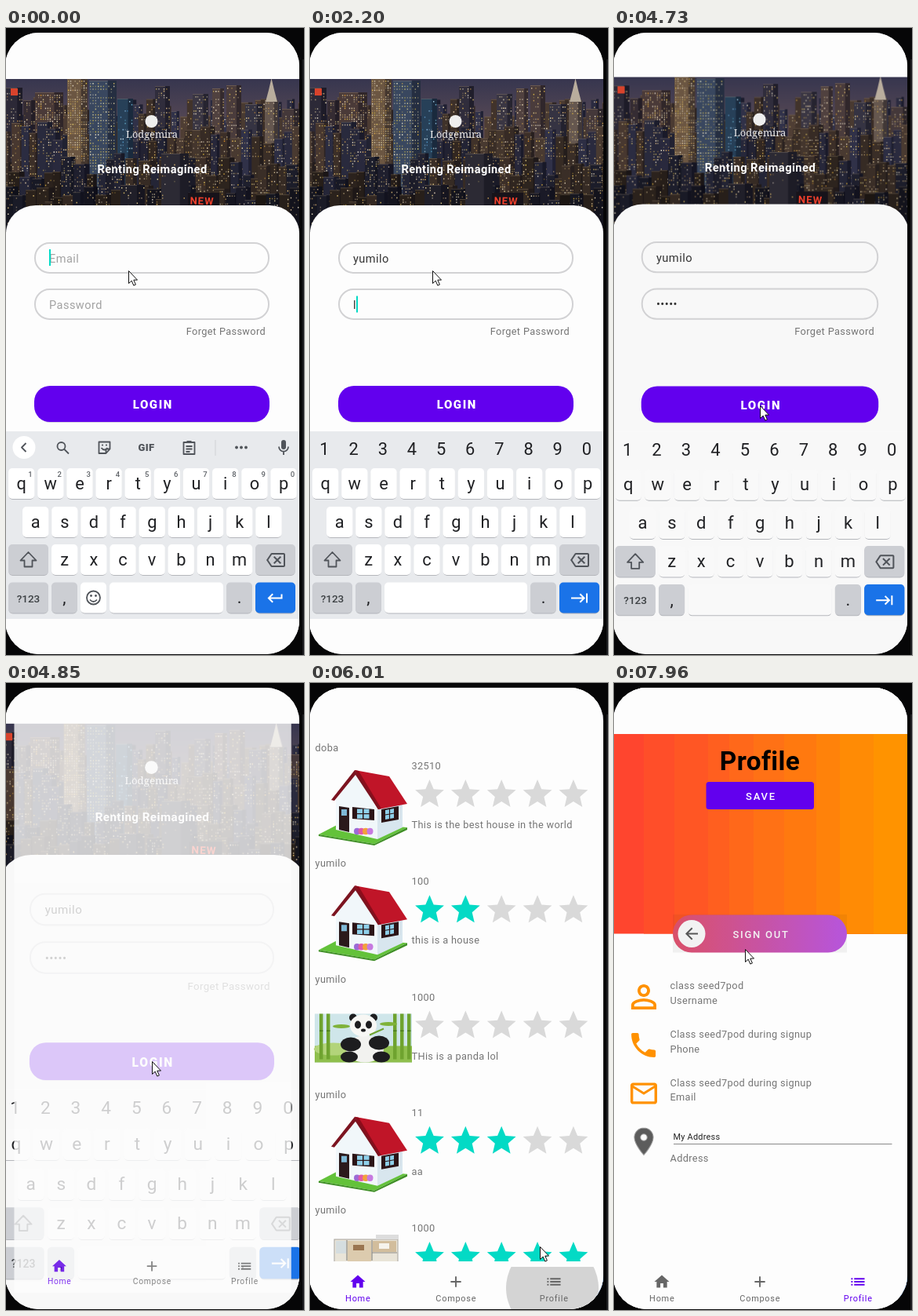
These frames come from a looping animation (380x799 px, 8000 ms). An HTML page with a canvas:

```html
<!DOCTYPE html>
<html lang="en">
<head>
<meta charset="utf-8">
<title>Rental app walkthrough</title>
<style>
  html, body { margin: 0; width: 100%; height: 100%; overflow: hidden; background: #060607; }
  #stage { position: relative; width: 380px; height: 799px; overflow: hidden; font-family: Roboto, sans-serif; }
  #edge { position: absolute; left: 378px; top: 40px; width: 2px; height: 759px; background: #1d1e21; }
  #phone, .layer, svg { position: absolute; left: 0; top: 0; width: 380px; height: 799px; }
  #phone { background: #fdfdfd; clip-path: inset(6px 6px 1px -1px round 43px); }
  .layer { transform-origin: 187px 402px; }
  #login { --board: #e8eaed; --card: #fdfdfd; --key: #fff; }
  #login.leaving { --board: #f8f8f8; --card: #f8f8f8; --key: #f9f9f9; }
  canvas { position: absolute; left: 0; top: 65px; }
  text { white-space: pre; }
  .body { font-size: 14.56px; letter-spacing: .03125em; }
  .small { font-size: 12.74px; letter-spacing: .028em; fill: #757575; }
  .nav { font-size: 10.92px; letter-spacing: .07em; text-anchor: middle; }
  .btn { font-weight: 500; font-size: 13px; letter-spacing: .135em; fill: #fff; text-anchor: middle; }
  .mid { text-anchor: middle; }
  .line { fill: none; stroke: #50545a; stroke-width: 1.8; stroke-linejoin: round; }
</style>
</head>
<body>
<div id="stage">
  <div id="edge"></div>
  <div id="phone">
    <div class="layer" id="login"><canvas id="city" width="374" height="200"></canvas><svg id="form"></svg></div>
    <div class="layer" id="app"><svg id="pages"></svg></div>
  </div>
  <svg id="pointer"><path id="cursor" d="M.5 .5v16l3.7-3.4 2.6 6 2.6-1.1-2.6-5.9h4.7z" fill="#fff" stroke="#111"/></svg>
</div>
<script>
const $ = id => document.getElementById(id);
const clamp = v => Math.max(0, Math.min(1, v));
const USER = 'yumilo', SECRET = 'lollo';

// ---- markup helpers ----
const text = (x, y, s, attrs = '') => `<text x="${x}" y="${y}" ${attrs}>${s}</text>`;
const rect = (x, y, w, h, fill, r = 0, attrs = '') =>
  `<rect x="${x}" y="${y}" width="${w}" height="${h}" rx="${r}" fill="${fill}" ${attrs}/>`;
const poly = (points, fill) => `<polygon points="${points}" fill="${fill}"/>`;
const oval = (x, y, rx, ry, fill) => `<ellipse cx="${x}" cy="${y}" rx="${rx}" ry="${ry}" fill="${fill}"/>`;
const line = (d, attrs = '') => `<path class="line" d="${d}" ${attrs}/>`;
const icon = (name, x, y, s, fill, attrs = '') =>
  `<path d="${ICONS[name]}" transform="translate(${x - 12 * s} ${y - 12 * s}) scale(${s})" ${fill && `fill="${fill}"`} fill-rule="evenodd" ${attrs}/>`;
const each = (list, fn) => [...list].map(fn).join('');

const ICONS = {
  star: 'M12 17.27L18.18 21l-1.64-7.03L22 9.24l-7.19-.61L12 2 9.19 8.63 2 9.24l5.46 4.73L5.82 21z',
  home: 'M10 20v-6h4v6h5v-8h3L12 3 2 12h3v8z',
  plus: 'M19 13h-6v6h-2v-6H5v-2h6V5h2v6h6z',
  list: 'M3 13h2v-2H3zm0 4h2v-2H3zm0-8h2V7H3zm4 4h14v-2H7zm0 4h14v-2H7zM7 7v2h14V7z',
  person: 'M12 5.9a2.1 2.1 0 1 1 0 4.2 2.1 2.1 0 0 1 0-4.2m0 9c2.97 0 6.1 1.46 6.1 2.1v1.1H5.9V17c0-.64 3.13-2.1 6.1-2.1M12 4C9.79 4 8 5.79 8 8s1.79 4 4 4 4-1.79 4-4-1.79-4-4-4zm0 9c-2.67 0-8 1.34-8 4v3h16v-3c0-2.66-5.33-4-8-4z',
  call: 'M6.62 10.79c1.44 2.83 3.76 5.14 6.59 6.59l2.2-2.2c.27-.27.67-.36 1.02-.24 1.12.37 2.33.57 3.57.57.55 0 1 .45 1 1V20c0 .55-.45 1-1 1-9.39 0-17-7.61-17-17 0-.55.45-1 1-1h3.5c.55 0 1 .45 1 1 0 1.25.2 2.45.57 3.57.11.35.03.74-.25 1.02z',
  mail: 'M22 6c0-1.1-.9-2-2-2H4c-1.1 0-2 .9-2 2v12c0 1.1.9 2 2 2h16c1.1 0 2-.9 2-2zm-2 0-8 5-8-5zm0 12H4V8l8 5 8-5z',
  pin: 'M12 2C8.13 2 5 5.13 5 9c0 5.25 7 13 7 13s7-7.75 7-13c0-3.87-3.13-7-7-7zm0 9.5a2.5 2.5 0 0 1 0-5 2.5 2.5 0 0 1 0 5z',
  back: 'M20 11H7.83l5.59-5.59L12 4l-8 8 8 8 1.41-1.41L7.83 13H20z',
  erase: 'M22 3H7c-.69 0-1.23.35-1.59.88L0 12l5.41 8.11c.36.53.9.89 1.59.89h15c1.1 0 2-.9 2-2V5c0-1.1-.9-2-2-2zm0 16H7.07L2.4 12l4.66-7H22zm-11.59-2L14 13.41 17.59 17 19 15.59 15.41 12 19 8.41 17.59 7 14 10.59 10.41 7 9 8.41 12.59 12 9 15.59z',
  enter: 'M19 7v4H5.83l3.58-3.59L8 6l-6 6 6 6 1.41-1.41L5.83 13H21V7z',
  tab: 'M11.59 7.41 15.17 11H1v2h14.17l-3.59 3.59L13 18l6-6-6-6zM20 6v12h2V6z'
};

// ---- night skyline ----
function drawCity() {
  const c = $('city').getContext('2d');
  let seed = 4711;
  const rnd = () => (seed = seed * 16807 % 2147483647) / 2147483647;
  c.translate(0, -65);
  const sky = c.createLinearGradient(0, 65, 0, 130);
  sky.addColorStop(0, '#37364f');
  sky.addColorStop(1, '#5b4b55');
  c.fillStyle = sky;
  c.fillRect(0, 65, 374, 200);

  // Floors differ in brightness, so a tower reads as broken rows of light.
  function tower(x, top, w, base, lit, hue = 34) {
    c.fillStyle = base;
    c.fillRect(x, top, w, 265 - top);
    c.fillStyle = 'rgba(6,6,18,.38)';
    c.fillRect(x + w * .68, top, w * .32, 265 - top);
    c.fillStyle = 'rgba(215,185,150,.22)';
    c.fillRect(x, top, w * .68, 1);
    const stepX = 2.2 + rnd() * 1.2, stepY = 2.6 + rnd() * 1.4;
    for (let y = top + 3; y < 262; y += stepY) {
      const floor = lit * (.4 + rnd() * 1.1);
      for (let i = x + 1; i < x + w - 1; i += stepX)
        if (rnd() < floor) {
          c.fillStyle = `hsla(${hue + rnd() * 14},${35 + rnd() * 35}%,${50 + rnd() * 38}%,${.3 + rnd() * .7})`;
          c.fillRect(i, y, 1.4, 1.6);
        }
    }
  }
  const row = (top, depth, width, light, lit) => {
    for (let x = -6; x < 374; x += width * (.5 + rnd() * .5))
      tower(x, top + rnd() * depth, width * (.7 + rnd() * .6), `hsl(${rnd() < .5 ? 238 : 22},20%,${light + rnd() * 8}%)`, lit);
  };

  row(88, 26, 13, 19, .36);
  [[0, 76, 21, '#2c2937', .4], [22, 92, 15, '#352c33', .4], [37, 82, 36, '#4a3a38', .55],
   [190, 74, 19, '#302d3c', .4], [238, 84, 20, '#3a3643', .4], [263, 77, 15, '#50413f', .4],
   [281, 73, 19, '#4a3c3c', .42], [305, 97, 22, '#353342', .42], [330, 92, 17, '#65574f', .55],
   [352, 103, 22, '#44383a', .45]].forEach(b => tower(...b));
  c.fillStyle = '#b9ad9d';
  c.beginPath();
  c.moveTo(331, 94); c.lineTo(335, 79); c.lineTo(338.5, 64); c.lineTo(342, 79); c.lineTo(346, 94);
  c.fill();
  row(118, 30, 15, 16, .38);
  tower(78, 64, 26, '#6b5642', .78);
  tower(106, 67, 35, '#39475f', .62, 42);
  tower(142, 90, 20, '#274058', .35, 195);
  row(158, 34, 17, 12, .34);
  row(198, 24, 20, 9, .26);
  tower(198, 160, 35, '#2c2a34', .1);
  tower(146, 200, 31, '#201f29', .16);
  c.fillStyle = '#17131a';
  c.fillRect(232, 210, 40, 55);
  c.fillStyle = '#d8432c';
  c.fillRect(6, 77, 9, 9);
}

// ---- login form and keyboard ----
const LETTER = 'font-size="21.8" class="mid" fill="#202124"';
const GREY = '#ccced3';
const key = (x, y, w, label = '', fill = 'var(--key)') =>
  rect(x + .5, y + 1, w - 1, 39, '#b4b6bb', 5) + rect(x, y, w, 39, fill, 5) + text(x + w / 2, y + 26.5, label, LETTER);
const DIGITS = '1234567890', PITCH = 37.15;

function keyboard() {
  const row = (letters, x, y) => each(letters, (l, i) => key(x + i * PITCH, y, 33.3, l));
  return rect(0, 514, 374, 239, 'var(--board)') +
    row('qwertyuiop', 3, 561) + row('asdfghjkl', 21, 610) + row('zxcvbnm', 58, 658) +
    key(3, 658, 51, '', GREY) + line('M28.5 668l-10 10.5h5v8h10v-8h5z') +
    key(318, 658, 51, '', GREY) + icon('erase', 344, 678, 1, '#50545a') +
    key(3, 706.5, 51, '', GREY) + text(28.5, 731.5, '?123', 'font-size="13.5" font-weight="500" class="mid" fill="#3c4043"') +
    key(58, 706.5, 33, ',', GREY) + key(281, 706.5, 33, '.', GREY) + key(318, 706.5, 51, '', '#1a73e8') +
    `<g id="mailKeys">` + key(95, 706.5, 33) + key(132, 706.5, 145) + icon('enter', 343.5, 726.5, 1, '#fff') +
    `<circle class="line" cx="111.5" cy="726" r="8.5"/>` + line('M107 728.5q4.5 5 9 0') +
    oval(108.5, 723.5, 1.4, 1.4, '#50545a') + oval(114.5, 723.5, 1.4, 1.4, '#50545a') +
    each(DIGITS, (d, i) => text(31 + i * PITCH, 572, d, 'font-size="9.5" font-weight="500" class="mid" fill="#5f6368"')) +
    oval(23, 534.5, 14.5, 14.5, '#fff') + `<path class="line" id="chevron"/>` +
    rect(351, 525, 6, 12, '#50545a', 3) + line('M348 533.5a6 6.2 0 0 0 12 0M354 540v4') +
    `<g id="tools"><circle class="line" cx="70.5" cy="533" r="5"/>` + line('M74 536.5l6 6', 'stroke-width="2.2"') +
    line('M118.5 527.5h14v9l-5 5.5h-9zM121.5 535q4 5 8 0M132.5 536.5h-5v5') +
    oval(123, 531.5, 1.1, 1.1, '#50545a') + oval(128, 531.5, 1.1, 1.1, '#50545a') +
    text(179, 539, 'GIF', 'font-size="13" font-weight="900" letter-spacing=".4" class="mid" fill="#50545a"') +
    line('M226.5 528h14v15h-14zM229.5 533h8M229.5 536.5h8M229.5 540h5M230.5 527h6') +
    rect(266.5, 525, 1, 20, '#d0d2d6') + each([294, 300, 306], x => oval(x, 534.5, 1.9, 1.9, '#50545a')) + `</g>` +
    `<g id="words" font-size="13.2" class="mid" fill="#3c4043">` +
    each([82.5, 190, 297], (x, i) => text(x, 539, '', `id="word${i}"`)) +
    rect(136, 525, 1, 20, '#d0d2d6') + rect(243, 525, 1, 20, '#d0d2d6') + `</g></g>` +
    `<g id="passKeys">` + key(95, 706.5, 182) + icon('tab', 344, 726.5, 1, '#fff') +
    each(DIGITS, (d, i) => text(18.5 + i * PITCH, 543.5, d, LETTER)) + `</g>`;
}

$('form').innerHTML =
  rect(0, 0, 374, 65, '#fdfdfd') +
  oval(185.5, 119, 8, 8, '#eee') +
  text(186, 140, 'Lodgemira', 'font-size="12.8" font-family="Noto Serif, serif" class="mid" fill="#eee"') +
  text(186.5, 185, 'Renting Reimagined', 'class="body mid" font-weight="700" fill="#fff"') +
  text(250, 225, 'NEW', 'font-size="13" font-weight="700" letter-spacing="1" class="mid" fill="#f0402c" transform="rotate(2 250 220)"') +
  `<path d="M0 262A38 36 0 0 1 38 226H336A38 36 0 0 1 374 262V799H0z" fill="var(--card)"/>` +
  each([274, 333], y => rect(37, y, 298, 38, 'none', 18.5, 'stroke="#d2d2d4" stroke-width="2"')) +
  text(55, 298.5, '', 'id="mail" class="body"') + text(55, 357.5, '', 'id="pass" class="body"') +
  rect(55, 302, 0, 1, '#333', 0, 'id="under"') + rect(55, 282, 2, 21, '#03dac5', 0, 'id="caret"') +
  text(331, 391, 'Forget Password', 'class="small" text-anchor="end"') +
  rect(37, 458, 298, 45, '#d9d6e0', 20) + rect(36, 456, 300, 46, '#6200ee', 20) +
  text(187.3, 485.3, 'LOGIN', 'font-size="15" font-weight="800" letter-spacing="1.6" class="mid" fill="#fff"') +
  keyboard();

// ---- feed ----
const house =
  poly('11,193 40,178 124,184 82,205', '#63c23a') + poly('11,193 82,205 124,184 124,187 82,207 11,195', '#3f8f26') +
  poly('33,147 58,116 87,158 86,199 33,187', '#f1f7fa') + poly('86,160 118,154 118,184 86,199', '#d8e6ee') +
  poly('57,111 101,119 124,154 87,161', '#c01528') + poly('57,111 62,112 91,160 87,161', '#8d0c1b') +
  poly('57,111 27,149 31,150 58,117 87,161 88,157', '#7c1420') +
  poly('37,157 50,159 50,190 37,187', '#2b1a1c') + rect(40, 161, 7, 8, '#7fb9d6') +
  poly('54,158 82,161 82,175 54,173', '#2b1416') +
  each([60, 68.5], x => rect(x, 160.5, 7, 5.5, '#8fd0ea') + rect(x, 167.2, 7, 5.5, '#8fd0ea')) +
  poly('91,161 113,157 113,174 91,178', '#2b1416') + poly('96,162 107,160 107,172 96,174', '#8fd0ea') +
  line('M101.5 161v13M96 168l11-2', 'style="stroke:#2b1416;stroke-width:1.2"') +
  each(['#9b6bd6', '#e05aa8', '#f2a13a', '#c77ae0'], (c, i) => oval(60 + i * 5.5, 189, 4, 4.2, c));

const panda =
  rect(6, 127, 124, 62, '#cfe6ea') + rect(6, 168, 124, 21, '#8fbf4d') + oval(30, 172, 25, 8, '#b3d47a') +
  each([12, 21, 106, 115, 124], x => rect(x, 127, 4.5, 58, '#6fa32f') + rect(x, 148, 4.5, 1.5, '#4a7a1d')) +
  oval(40, 143, 11, 2.5, '#7fb23a') + oval(100, 140, 11, 2.5, '#7fb23a') +
  oval(70, 172, 24, 17, '#f2f2ef') + oval(52, 166, 13, 9, '#1d1d1f') + oval(88, 164, 13, 9, '#1d1d1f') +
  oval(50, 182, 11, 7, '#1d1d1f') + oval(91, 182, 11, 7, '#1d1d1f') +
  oval(55, 132, 5, 5, '#1d1d1f') + oval(81, 132, 5, 5, '#1d1d1f') + oval(68, 142, 17, 14, '#f7f7f4') +
  oval(61, 141, 4, 5, '#1d1d1f') + oval(75, 141, 4, 5, '#1d1d1f') + oval(68, 148, 3, 2, '#1d1d1f') +
  line('M76 154l18-8', 'style="stroke:#6fa32f;stroke-width:2"');

const plan =
  rect(31, 120, 81, 42, '#e9e4d8', 0, 'stroke="#a5a29b"') + rect(84, 114, 29, 6, '#ddd') +
  rect(48, 122, 30, 26, '#dccbae') + rect(80, 122, 30, 14, '#d2bd9c') + rect(33, 122, 13, 16, '#d5dddf') +
  line('M47 121v26M79 121v26M79 137h32', 'style="stroke:#8d8a83;stroke-width:1.2"') +
  rect(55, 127, 14, 7, '#9a7550') + rect(88, 125, 13, 7, '#f6f3ec');

const posts = [
  ['doba', 32510, 'This is the best house in the world', 0, house],
  [USER, 100, 'this is a house', 2, house],
  [USER, 1000, 'THis is a panda lol', 0, panda],
  [USER, 11, 'aa', 3, house],
  [USER, 1000, '', 5, plan]
];
const post = ([who, price, note, rating, picture], i) =>
  `<g transform="translate(0 ${i * 147.25})">` + text(6.5, 87, who, 'class="small"') +
  text(129.5, 110, price, 'class="small"') + `<g class="picture">${picture}</g>` +
  each('01234', n => icon('star', 152.5 + n * 45.85, 141.4, 1.84, '#d9d9d9', n < rating ? 'class="rated"' : '')) +
  text(129.5, 185, note, 'class="small"') + `</g>`;

// ---- profile ----
const bands = [0, 38, 77, 120, 147, 178, 217, 258, 288, 331];
const field = (y, value, label) => text(71.5, y, value, 'class="small"') + text(71.5, y + 18.5, label, 'class="small"');
const profile = rect(0, 0, 374, 740, '#fdfdfd') +
  each(bands, (x, i) => rect(x, 65, 374 - x, 254.5, `rgb(255 ${69 + i * 8.7} ${46 - i * 5.1})`)) +
  text(186, 111, 'Profile', 'font-size="33.3" font-weight="700" letter-spacing=".4" class="mid"') +
  rect(117.5, 126, 137.5, 35, '#6200ee', 3.5) + text(187.5, 148.8, 'SAVE', 'class="btn"') +
  rect(75, 295.5, 222, 48, 'url(#pill)', 24) + oval(99, 319.5, 17.5, 17.5, '#fff') + icon('back', 99, 319.5, 1, '#5c5c5c') +
  text(187.5, 324.5, 'SIGN OUT', 'class="btn"') + rect(75, 295, 222, 48.5, '#000', 0, 'id="press"') +
  icon('person', 38, 400, 2, '#ff9100') + icon('call', 37.6, 461.5, 1.72, '#ff9100') +
  icon('mail', 38, 523, 1.7, '#ff9100') + icon('pin', 38, 584.2, 1.72, '#5c5c5c', 'stroke="#999" stroke-width=".6"') +
  field(390, 'class seed7pod', 'Username') + field(452, 'Class seed7pod during signup', 'Phone') +
  field(513.5, 'Class seed7pod during signup', 'Email') +
  text(75.5, 582, 'My Address', 'font-size="10.92" letter-spacing=".24" fill="#222"') +
  rect(76, 587, 278.5, 1, '#8a8a8a') + text(71.5, 610, 'Address', 'class="small"');

const tabs = [['home', 61, 'Home'], ['plus', 186, 'Compose'], ['list', 311, 'Profile']];
$('pages').innerHTML =
  `<defs><clipPath id="listBox"><rect y="65" width="374" height="672"/></clipPath>
   <clipPath id="navBox"><rect y="744" width="374" height="55"/></clipPath>
   <linearGradient id="pill"><stop stop-color="#e5546f"/><stop offset="1" stop-color="#c05ae8"/></linearGradient></defs>` +
  rect(0, 0, 374, 799, '#fdfdfd') +
  `<g id="feed" clip-path="url(#listBox)">${posts.map(post).join('')}</g><g id="profile">${profile}</g>` +
  `<g clip-path="url(#navBox)"><circle id="ripple" cx="309" cy="771" fill="#d4d4d4"/></g>` +
  each(tabs, ([name, x, label], i) => `<g id="tab${i}">` + icon(name, x, 763, .95, '') + text(x + .3, 787.5, label, 'class="nav"') + `</g>`);
drawCity();

// ---- timeline ----
const route = [[0, 156, 309], [3230, 156, 309], [3970, 186, 481], [4850, 186, 481], [5340, 297, 747], [5530, 297, 747],
  [5740, 303, 761], [5950, 303, 761], [6010, 293, 718], [6055, 293, 718], [6640, 188, 189], [6735, 188, 189],
  [6740, 177, 246], [6795, 177, 246], [6800, 165, 283], [6940, 165, 283], [7000, 156, 318], [7060, 166, 343],
  [7390, 166, 343], [7440, 167, 339], [8000, 167, 339]];
const mailTimes = [500, 640, 790, 1050, 1110, 1180];
const passTimes = [2200, 2390, 2510, 2630, 2750];
const count = (times, t) => times.filter(v => v <= t).length;
const show = (el, on) => el.style.display = on ? '' : 'none';
const pictures = [...document.querySelectorAll('.picture')];
const rated = [...document.querySelectorAll('.rated')];

function pointerAt(t) {
  const i = route.findIndex(p => p[0] > t);
  const [t0, x0, y0] = route[i - 1], [t1, x1, y1] = route[i];
  const k = (t - t0) / (t1 - t0);
  return `translate(${Math.round(x0 + (x1 - x0) * k)} ${Math.round(y0 + (y1 - y0) * k)})`;
}

function drawForm(t) {
  const typed = count(mailTimes, t), secret = count(passTimes, t);
  const onPass = t >= 1760, mail = $('mail'), pass = $('pass'), caret = $('caret');
  mail.textContent = typed ? USER.slice(0, typed) : 'Email';
  mail.setAttribute('fill', typed ? '#333' : '#a2a2a2');
  const masked = t >= 4230 ? secret : secret - 1;
  pass.textContent = secret ? '•'.repeat(masked) + SECRET.slice(masked, secret) : 'Password';
  pass.setAttribute('fill', secret ? '#333' : '#a2a2a2');

  const width = (onPass ? secret : typed) ? (onPass ? pass : mail).getComputedTextLength() : 0;
  caret.setAttribute('x', 55 + width);
  caret.setAttribute('y', onPass ? 341.5 : 282);
  show(caret, t < 120 || (t >= 500 && t < 3250) || (t >= 3750 && t < 4230));
  $('under').setAttribute('width', typed && t < 1380 ? mail.getComputedTextLength() : 0);

  show($('mailKeys'), t < 1820);
  show($('passKeys'), t >= 1820);
  show($('tools'), !typed);
  show($('words'), typed);
  $('chevron').setAttribute('d', typed ? 'M21 529l5.5 5.5-5.5 5.5' : 'M25.5 529l-5.5 5.5 5.5 5.5');
  const words = t < 1380 ? [USER.slice(0, typed), 'you', 'young'] : ['I', 'the', 'thanks'];
  words.forEach((w, i) => $('word' + i).textContent = w);

  const leaving = t >= 4730;
  $('login').className = leaving ? 'layer leaving' : 'layer';
  $('login').style.transform = leaving ? `scale(${1 + .107 * clamp((t - 4700) / 400)})` : '';
}

function drawApp(t) {
  const app = $('app'), p = clamp((t - 4740) / 390);
  app.style.opacity = clamp((t - 4780) / 90);
  app.style.transform = p < 1 ? `scale(${1 - .15 * (1 - p) ** 3})` : '';
  show($('feed'), t >= 5080);
  pictures.forEach((el, i) => show(el, t >= 5530 + i * 50));
  rated.forEach(el => el.setAttribute('fill', t >= 5530 ? '#03dac5' : '#d9d9d9'));
  $('profile').style.opacity = clamp((t - 6080) / 200);
  $('ripple').setAttribute('r', t < 5950 ? 0 : 30 + 29 * clamp((t - 5950) / 60));
  $('ripple').style.opacity = 1 - clamp((t - 6250) / 200);
  const active = t < 6080 ? 0 : 2;
  tabs.forEach((_, i) => $('tab' + i).setAttribute('fill', i === active ? '#6200ee' : '#666'));
  $('press').style.opacity = .05 * clamp((t - 7390) / 400);
}

function frame() {
  const t = performance.now() % 8000;
  drawForm(t);
  drawApp(t);
  $('cursor').setAttribute('transform', pointerAt(t));
  requestAnimationFrame(frame);
}
frame();
</script>
</body>
</html>
```
